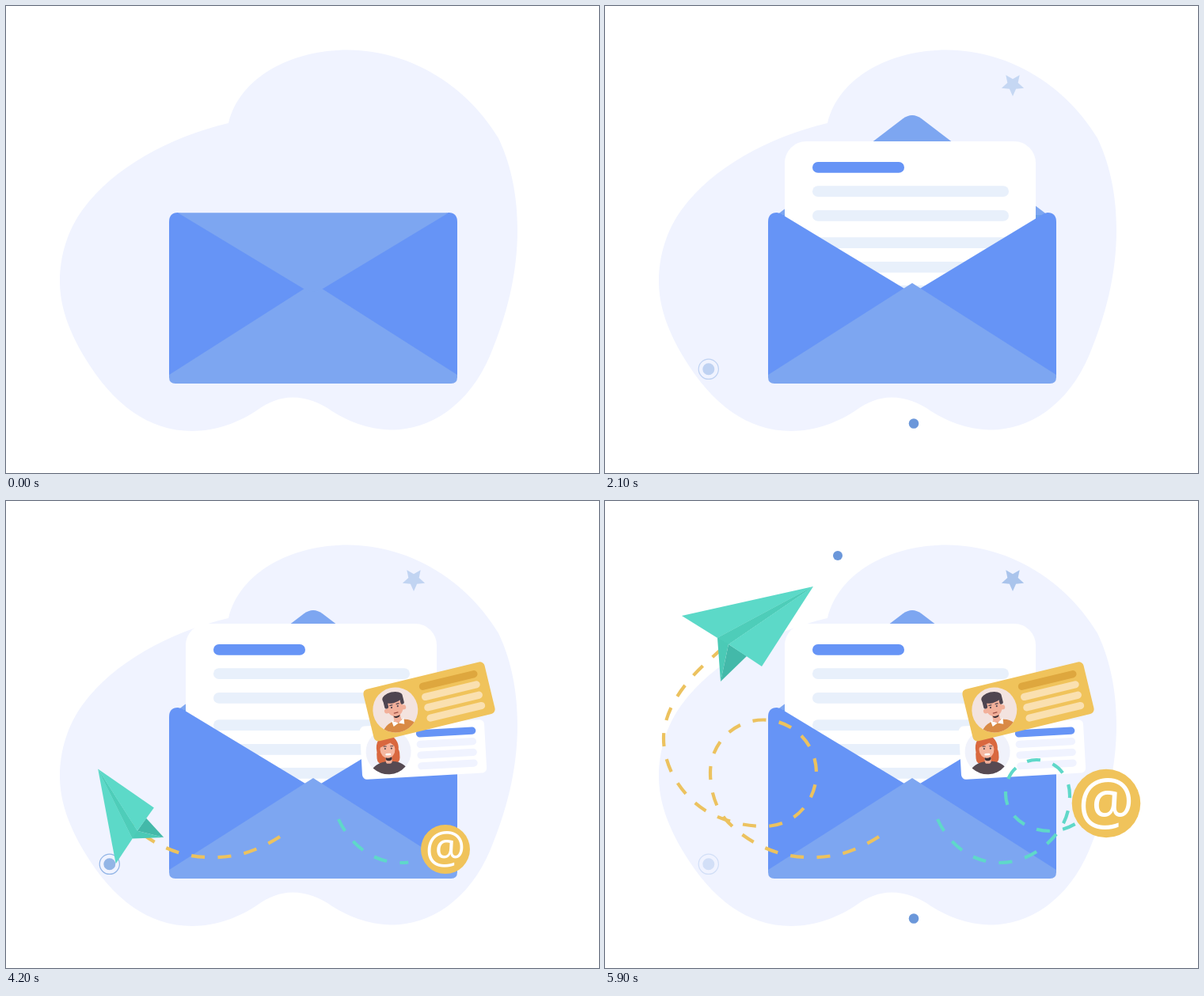
These frames come from a looping animation (749x590 px, 6 s). An HTML page with a canvas:

```html
<!DOCTYPE html>
<html lang="en">
<head>
<meta charset="utf-8">
<title>Envelope</title>
<style>
html, body { margin: 0; width: 100%; height: 100%; overflow: hidden; background: #fff; }
canvas { display: block; }
</style>
</head>
<body>
<canvas id="stage" width="749" height="590"></canvas>
<script>
const ctx = document.getElementById('stage').getContext('2d');
const LOOP = 6000, STEP = 100;
const BLUE = '#6694f6', SKY = '#7da6f1', GOLD = '#f0c35b', MINT = '#5cd9c8', SPARK = '#7ba5e0';

const blob = new Path2D('M281 148C295 90 360 55.5 432 55.5C515 56 585 105 622 167C640 205 646 245 646 283' +
  'C646 340 632 392 612 440C585 505 535 535.5 487 535.5C455 535 430 523 412 512C397 501 380 494.5 362 494.5' +
  'C345 494.5 331 501 318 510C295 526 265 537 235 537C180 537 135 503 100 445C80 412 68 380 68 348' +
  'C68 315 78 283 97 257C135 205 205 166 281 148Z');
const leftPanel = new Path2D('M206 467V273Q206 261 217 261Q219 261 222 262.5L388 363Z');
const bottomPanel = new Path2D('M206 466L388 350L570 466V469Q570 477 562 477H214Q206 477 206 469Z');
const inside = new Path2D('M221 264H555L388 364Z');
// Flap coordinates are relative to the hinge
const flap = new Path2D('M-169 1.5V0L-12 -120Q0 -129 12 -120L169 0V1.5Z');

function route(...parts) {
  let d = '';
  const lengths = [0];
  const el = document.createElementNS('http://www.w3.org/2000/svg', 'path');
  for (const part of parts) {
    d += part;
    el.setAttribute('d', d);
    lengths.push(el.getTotalLength());
  }
  const times = [3800, 4200, 4900, 5600];
  return {
    path: new Path2D(d),
    total: lengths[3],
    distance: t => keyed(t, times.map((time, i) => [time, lengths[i]])),
    at: s => el.getPointAtLength(s),
    heading(s) {
      const a = el.getPointAtLength(Math.max(0, s - 2)), b = el.getPointAtLength(Math.min(lengths[3], s + 2));
      return Math.atan2(b.y - a.y, b.x - a.x);
    }
  };
}

const planeRoute = route(
  'M346 424C310 447 283 451 253 450C215 449 177 430 152 402',
  'C141 389 133 368 133 343C133 306 163 276.5 200 276.5C237 276.5 267 306 267 343.5C267 378 242 407 209 410.5',
  'C176 413 146 402 130 393C95 372 74 335 74 300C74 262 103 225 135 198C147 187 163 173 176 161');
const badgeRoute = route(
  'M420 402C436 437 466 457 499 457C522 457 541 447 555 436',
  'C575 419 587 400 587 372C587 345 568 327 545 327C540 327 536 328 532 329.5',
  'C515 336 506 350 506 370C506 397 532 417 562 417C590 417 608 398 633 378');

function keyed(t, keys) {
  if (t <= keys[0][0]) return keys[0][1];
  for (let i = 1; i < keys.length; i++) {
    const [t0, v0] = keys[i - 1], [t1, v1] = keys[i];
    if (t <= t1) return v0 + (v1 - v0) * (t - t0) / (t1 - t0);
  }
  return keys[keys.length - 1][1];
}

function fill(color, path) {
  ctx.fillStyle = color;
  path ? ctx.fill(path) : ctx.fill();
}

function disc(x, y, r, color) {
  ctx.beginPath();
  ctx.arc(x, y, r, 0, Math.PI * 2);
  fill(color);
}

function oval(x, y, rx, ry, color) {
  ctx.beginPath();
  ctx.ellipse(x, y, rx, ry, 0, 0, Math.PI * 2);
  fill(color);
}

function box(x, y, w, h, r, color) {
  ctx.beginPath();
  ctx.roundRect(x, y, w, h, r);
  fill(color);
}

function poly(color, ...points) {
  ctx.beginPath();
  points.forEach(([x, y]) => ctx.lineTo(x, y));
  ctx.closePath();
  fill(color);
}

function placed(x, y, angle, sx, sy, draw) {
  ctx.save();
  ctx.translate(x, y);
  ctx.rotate(angle);
  ctx.scale(sx, sy);
  draw();
  ctx.restore();
}

function drawSparks(t) {
  if (t % 800 > 200 && t % 800 < 500) disc(294, 69, 6, '#6b97da');
  if (t % 900 > 200 && t % 900 < 600) disc(390, 527.5, 6.3, '#6b97da');

  ctx.globalAlpha = keyed(t, [[0, 0], [1200, 1], [2100, .36], [2900, .28], [4200, .4], [4900, .33], [5900, .6]]);
  const star = Array.from({ length: 10 }, (_, i) => {
    const a = Math.PI / 2 + i * Math.PI / 5, r = i % 2 ? 7 : 14.8;
    return [515 + r * Math.cos(a), 99.2 + r * Math.sin(a)];
  });
  poly('#7ba5df', ...star);

  ctx.globalAlpha = keyed(t, [[0, 0], [1200, .26], [2100, .42], [2900, 1], [4200, .8], [4900, .36], [5900, .26]]);
  disc(130.8, 458.8, 7.5, SPARK);
  ctx.beginPath();
  ctx.arc(130.8, 458.8, 12.6, 0, Math.PI * 2);
  ctx.strokeStyle = SPARK;
  ctx.lineWidth = 1.2;
  ctx.stroke();
  ctx.globalAlpha = 1;
}

function drawPaper(t) {
  if (t < 1300) return;
  const top = Math.max(155, 171 - .265 * (t - 2100));
  ctx.save();
  ctx.beginPath();
  ctx.rect(0, 0, 749, 465);
  ctx.clip();
  box(227, top, 317, 300, 27, '#fff');
  box(262, top + 26, 116, 13.8, 6.9, BLUE);
  for (const dy of [56.3, 87, 121.2, 152, 182]) box(262, top + dy, 248, 13.8, 6.9, '#e8f0fb');
  ctx.restore();
}

function drawEnvelope(t) {
  const open = keyed(t, [[700, -.79], [1200, 1]]);
  const drawFlap = () => placed(388, 262.5, 0, 1, open, () => fill(SKY, flap));
  if (open > 0) drawFlap();
  fill('#6a9ee9', inside);
  drawPaper(t);
  fill(BLUE, leftPanel);
  placed(776, 0, 0, -1, 1, () => fill(BLUE, leftPanel));
  fill(SKY, bottomPanel);
  if (open <= 0) drawFlap();
}

function drawMan() {
  oval(0, 27, 22, 14, '#d98a45');
  box(-4.5, 4, 9, 12, 3, '#f2b09a');
  poly('#fff', [-8, 12], [0, 17], [8, 12], [7, 20], [0, 17], [-7, 20]);
  disc(-11, -1, 3, '#f2b09a');
  disc(11, -1, 3, '#f2b09a');
  oval(0, 7, 4, 3, '#3b3036');
  oval(0, -3, 10.5, 11, '#f2b09a');
  oval(0, -16, 13, 7, '#4f4550');
  box(-12.5, -16, 5, 12, 2, '#4f4550');
  box(8.5, -16, 4.5, 11, 2, '#4f4550');
  drawEyes('#4f4550');
  box(-3, 3, 6, 1.3, .6, '#9b4b42');
}

function drawWoman() {
  oval(-1, -5, 14, 16, '#d9683f');
  box(-15, -6, 29, 22, 8, '#d9683f');
  oval(0, 26, 23, 14, '#564a52');
  box(-4, 4, 8, 11, 3, '#f2b09a');
  oval(0, 8.5, 4, 3, '#3b3036');
  oval(-1, -3, 9.5, 11, '#f5b7a0');
  poly('#d9683f', [-12, -5], [-8, -15], [8, -15], [11, -4], [3, -11]);
  drawEyes('#564a52');
  box(-4, 2, 7, 2.6, 1.3, '#fff');
}

function drawEyes(color) {
  disc(-4, -4, 1.1, color);
  disc(4, -4, 1.1, color);
  ctx.fillRect(-6, -7.5, 4, 1.1);
  ctx.fillRect(2.5, -7.5, 4, 1.1);
}

function drawCard(t, start, x, y, angle, [base, ring, title, line], drawPerson) {
  const p = Math.min(1, (t - start) / 600);
  if (p <= 0) return;
  const scale = 1 - (1 - p) ** 3;
  placed(x, y, angle * Math.PI / 180, scale, scale, () => {
    box(-78.7, -33.7, 157.4, 67.4, 6, base);
    [-20.4, -6.8, 6.9, 20.6].forEach((dy, i) => box(-8, dy - 4.6, 75.6, 9.2, 4.6, i ? line : title));
    ctx.translate(-44, .3);
    disc(0, 0, 28.5, ring);
    ctx.clip();
    drawPerson();
  });
}

function drawTrail(path, color, length) {
  const dash = [];
  for (let s = 0; s < length; s += 33.4) dash.push(Math.min(17, length - s), 16.4);
  ctx.setLineDash([...dash, 0, 9999]);
  ctx.strokeStyle = color;
  ctx.lineWidth = 4.2;
  ctx.stroke(path);
  ctx.setLineDash([]);
}

function drawPlane(s, scale) {
  const { x, y } = planeRoute.at(s);
  const turn = planeRoute.heading(s) - planeRoute.heading(planeRoute.total);
  placed(x, y, turn, scale, scale, () => {
    const nose = [87, -53], fold = [-34, 12], keel = [-30, 67], crease = [-20, 20];
    poly('#4bcab6', nose, fold, keel, crease);
    poly('#43b9a9', crease, keel, [3, 35]);
    poly(MINT, nose, [-79, -16], fold);
    poly('#4ecdb9', nose, fold, crease);
    poly(MINT, nose, crease, [22, 48]);
  });
}

function drawBadge(s, scale) {
  const { x, y } = badgeRoute.at(s);
  placed(x, y + 4, 0, scale, scale, () => {
    disc(0, 0, 43.3, GOLD);
    ctx.font = '500 80px "Open Sans", "Noto Sans", sans-serif';
    ctx.textAlign = 'left';
    ctx.fillStyle = '#fff';
    const m = ctx.measureText('@');
    ctx.fillText('@', (m.actualBoundingBoxLeft - m.actualBoundingBoxRight) / 2,
      (m.actualBoundingBoxAscent - m.actualBoundingBoxDescent) / 2);
  });
}

function drawTravellers(t) {
  if (t < 3800) return;
  const scale = keyed(t, [[3800, .635], [5600, 1]]);
  const planeAt = planeRoute.distance(t);
  drawTrail(planeRoute.path, '#ecc25f', planeAt);
  drawTrail(badgeRoute.path, '#5fd8c9', keyed(t, [[3860, 0], [4200, 111], [5600, badgeRoute.total]]));
  drawPlane(planeAt, scale);
  drawBadge(badgeRoute.distance(t), scale);
}

function render(t) {
  ctx.fillStyle = '#fff';
  ctx.fillRect(0, 0, 749, 590);
  fill('#f0f3ff', blob);
  drawSparks(t);
  drawEnvelope(t);
  drawCard(t, 3000, 527, 314, -3.2, ['#fff', '#f0f2fb', BLUE, '#f0f3ff'], drawWoman);
  drawCard(t, 2300, 534.5, 253.3, -13.6, [GOLD, '#f3e3df', '#dea73e', '#fae0b0'], drawMan);
  drawTravellers(t);
}

const begin = performance.now();
function tick() {
  const t = (performance.now() - begin) % LOOP;
  render(Math.floor(t / STEP) * STEP);
  requestAnimationFrame(tick);
}
tick();
</script>
</body>
</html>
```
